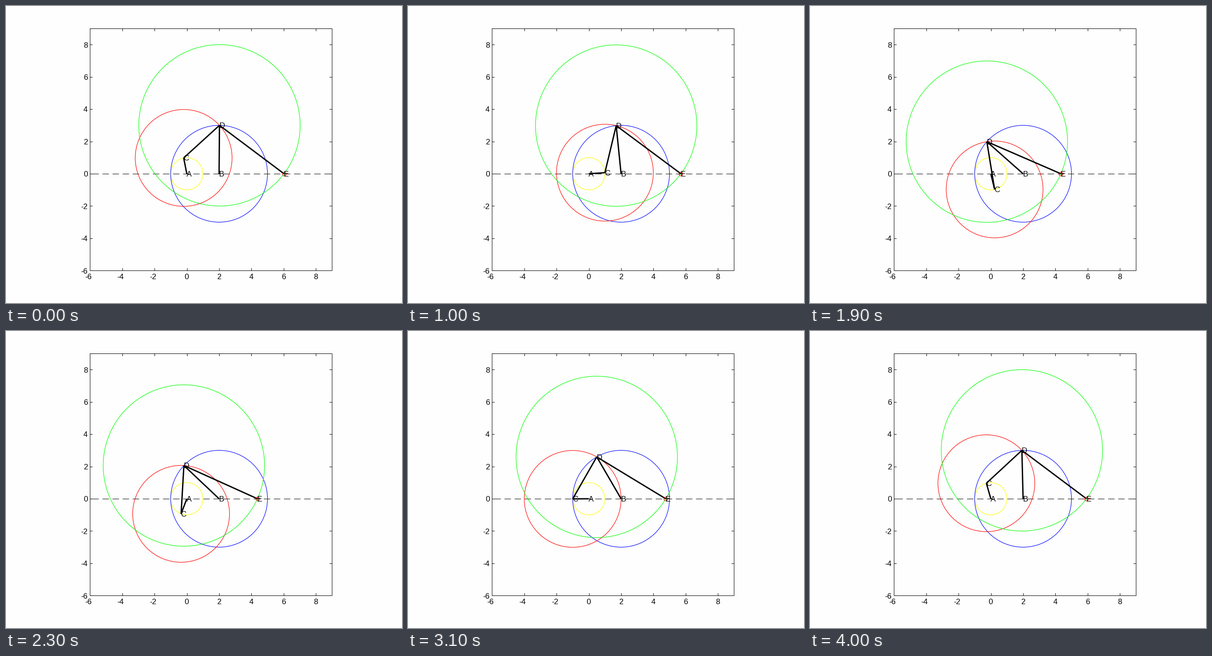
A matplotlib script that plays this animation: 864 px wide and 648 px high, repeating every 4.1 s.

```python
import math

import matplotlib.pyplot as plt
import numpy as np
from matplotlib.animation import FuncAnimation

W, H, DPI = 864, 648, 100
FRAMES, INTERVAL = 41, 100
PAPER = "#fdfefd"
PX = 72 / DPI                      # one pixel in points

UNIT = 35.207                      # pixels per data unit
X0, Y0 = 394.5, 366.0              # origin in pixels, y downwards
LOW, HIGH = -6, 9

CRANK, ROCKER, COUPLER, ROD = 1, 3, 3, 5
A = np.array([0.0, 0.0])
B = np.array([2.0, 0.0])
START, STEP = 1.767, 0.1           # crank angle in radians

plt.rcParams["font.family"] = "Liberation Sans"
fig = plt.figure(figsize=(W / DPI, H / DPI), dpi=DPI, facecolor=PAPER)
ax = fig.add_axes([0, 0, 1, 1])
ax.set_xlim(0, W)
ax.set_ylim(H, 0)
ax.axis("off")


def to_px(point):
    return X0 + UNIT * point[0], Y0 - UNIT * point[1]


def line(xs, ys, width=1.0, color="black", **kw):
    return ax.plot(xs, ys, color=color, lw=width * PX, **kw)[0]


def label(x, y, text, **kw):
    return ax.text(x, y + 6, text, size=12, va="baseline", **kw)


def draw_frame():
    left, bottom = to_px((LOW, LOW))
    right, top = to_px((HIGH, HIGH))
    line([left, right, right, left, left], [bottom, bottom, top, top, bottom],
         snap=True, zorder=1)
    for v in range(LOW, HIGH, 2):
        x, y = to_px((v, v))
        for edge, inward in ((bottom, -5), (top, 5)):
            line([x, x], [edge, edge + inward], snap=True, zorder=1)
        for edge, inward in ((left, 5), (right, -5)):
            line([edge, edge + inward], [y, y], snap=True, zorder=1)
        shift = -3.8 if v < 0 else 0
        label(x + shift, 590, str(v), ha="center")
        label(178.3, y + 0.3, str(v), ha="right")
    line([left + 5, right], [Y0 - 0.3, Y0 - 0.3], snap=True, zorder=1,
         dashes=(14, 8), dash_capstyle="butt")


def add_circle(color):
    circle = plt.Circle((0, 0), 1, fill=False, ec=color, lw=1.1 * PX, zorder=2)
    return ax.add_patch(circle)


def place_circle(circle, center, radius):
    circle.center = to_px(center)
    circle.radius = radius * UNIT


def crank_angle(i):
    # after the opening pose the crank advances two and one steps in turn
    steps = 2 + math.ceil(1.5 * i) if i else 0
    return START - STEP * steps


def solve(angle):
    c = CRANK * np.array([math.cos(angle), math.sin(angle)])
    span = B - c
    dist = np.hypot(*span)
    height = math.sqrt(COUPLER ** 2 - (dist / 2) ** 2)
    normal = np.array([-span[1], span[0]]) / dist
    d = (B + c) / 2 + height * normal
    e = np.array([d[0] + math.sqrt(ROD ** 2 - d[1] ** 2), 0.0])
    return c, d, e


draw_frame()
crank_ring, rocker_ring, coupler_ring, rod_ring = (
    add_circle(c) for c in ("#ffff00", "#0000ff", "#ff0000", "#00ff00"))
place_circle(crank_ring, A, CRANK)
place_circle(rocker_ring, B, ROCKER)

links = [line([], [], 2.9, solid_capstyle="butt", zorder=3) for _ in range(4)]
slider = line([], [], 1.1, "none", marker="o", ms=6, mfc="none",
              mec="#ff0000", mew=1.1 * PX, zorder=4)
names = [label(0, 0, n, ha="left", zorder=5) for n in "ABCDE"]


def update(i):
    c, d, e = solve(crank_angle(i))
    place_circle(coupler_ring, c, COUPLER)
    place_circle(rod_ring, d, ROD)
    for link, ends in zip(links, ((A, c), (c, d), (B, d), (d, e))):
        link.set_data(*zip(*map(to_px, ends)))
    ex, ey = to_px(e)
    slider.set_data([ex], [ey])
    for name, point in zip(names, (A, B, c, d, e)):
        x, y = to_px(point)
        name.set_position((x - 0.5, y + 6))
    return [coupler_ring, rod_ring, slider, *links, *names]


anim = FuncAnimation(fig, update, frames=FRAMES, interval=INTERVAL,
                     repeat=True, repeat_delay=0, blit=False)
plt.show()
```
